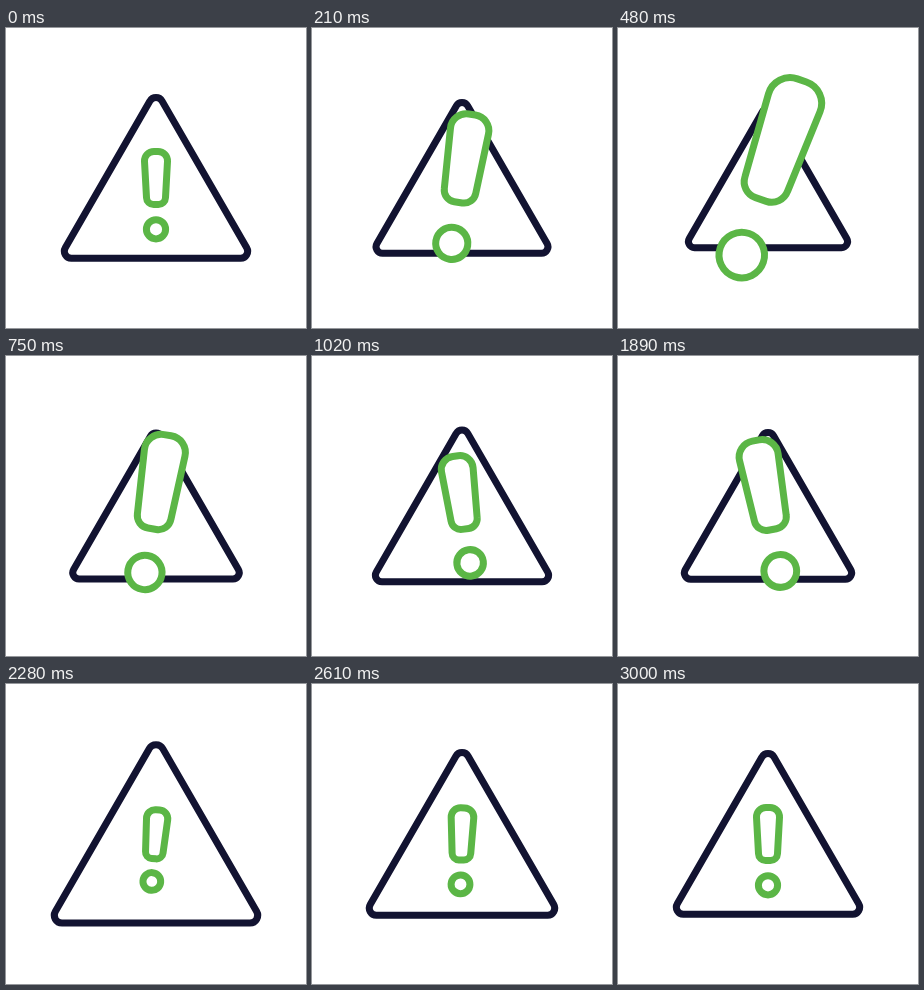
Write an HTML page without scripts that moves like this. It is 300 px wide and 300 px high and loops after 5030 ms.

```html
<!DOCTYPE html>
<html lang="en">
<head>
<meta charset="utf-8">
<title>Warning sign</title>
<style>
  html, body { margin: 0; width: 100%; height: 100%; overflow: hidden; background: #fff; }
  svg { display: block; width: 100%; height: 100%; }

  path, circle { fill: #fff; stroke: #5bb646; stroke-width: 7; vector-effect: non-scaling-stroke; }
  .frame { stroke: #121331; }

  .frame, .mark, .grow {
    animation: 5030ms cubic-bezier(.37, 0, .63, 1) infinite;
  }
  .frame { animation-name: breathe; }
  .mark { animation-name: tilt, bob; }
  .grow { animation-name: grow; }

  @keyframes breathe {
    0% { scale: 1; }
    8.75% { scale: .867; }
    20.7% { scale: .945; }
    31.4% { scale: .865; animation-timing-function: cubic-bezier(.4, 0, .7, .1); }
    37.6% { scale: .913; animation-timing-function: cubic-bezier(.3, .2, .6, 1); }
    43.3% { scale: 1.12; }
    54.1%, 100% { scale: 1; }
  }
  @keyframes tilt {
    0% { rotate: 0deg; }
    8.75% { rotate: 19.2deg; }
    27%, 31.8% { rotate: -19.2deg; }
    46.1% { rotate: 5deg; }
    55.7%, 100% { rotate: 0deg; }
  }
  @keyframes bob {
    0% { translate: 0 0; }
    8.75% { translate: 0 1px; }
    20.3% { translate: 0 -2px; }
    28%, 31.8% { translate: 0 1px; }
    45.3% { translate: 0 -2px; }
    55.7%, 100% { translate: 0 0; }
  }
  @keyframes grow {
    0% { scale: 1; }
    8.55% { scale: 2.39; }
    19.9% { scale: 1.38; }
    29.6%, 31.8% { scale: 2.39; }
    43.9% { scale: .92; }
    55.7%, 100% { scale: 1; }
  }
</style>
</head>
<body>
<svg viewBox="0 0 300 300">
  <g transform="translate(150 150)">
    <path class="frame" d="M-6.1-76.9A7 7 0 0 1 6.1-76.9L90.7 69.8A7 7 0 0 1 84.7 80.3H-84.7A7 7 0 0 1-90.7 69.8Z"/>
    <g class="mark">
      <!-- the mark scales from the foot of its bar -->
      <g transform="translate(0 30)">
        <g class="grow">
          <path d="M-2-56.6H2A9.5 9.5 0 0 1 11.5-46.6L9.5-10.4A7.1 7.1 0 0 1 2.4-3.5H-2.4A7.1 7.1 0 0 1-9.5-10.4L-11.5-46.6A9.5 9.5 0 0 1-2-56.6Z"/>
          <circle cy="21.3" r="9.6"/>
        </g>
      </g>
    </g>
  </g>
</svg>
</body>
</html>
```
